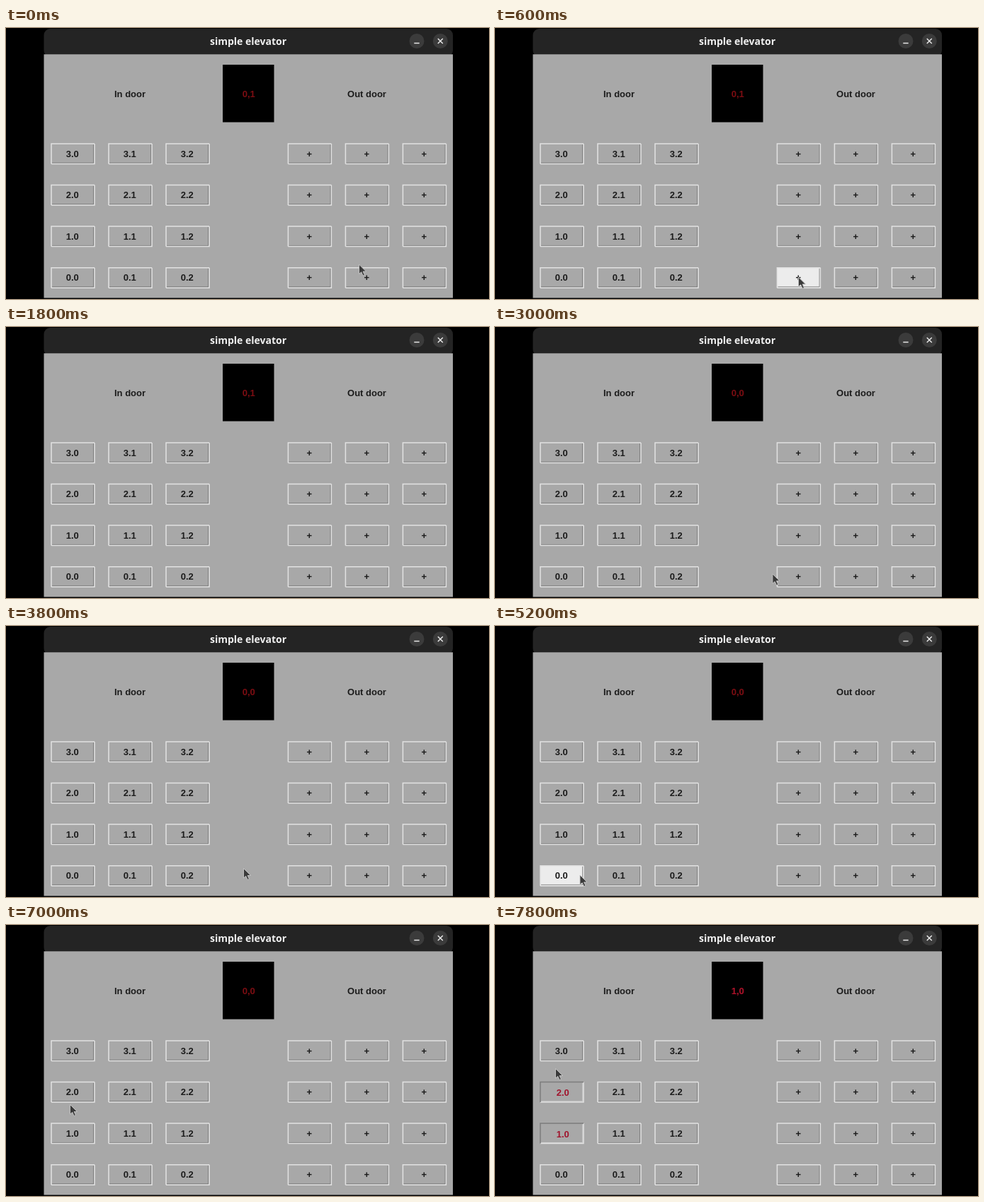
An HTML page that plays this animation: 682 by 384 pixels, repeating every 8000 ms.

```html
<!DOCTYPE html>
<html lang="en">
<head>
<meta charset="utf-8">
<title>simple elevator</title>
<style>
html, body { margin: 0; width: 100%; height: 100%; overflow: hidden; background: #000; }
svg { display: block; width: 682px; height: 384px; }
text { font: bold 13px "Liberation Sans", Arial, sans-serif; text-anchor: middle; fill: #1c1c1c; }
.title { font: bold 14px "Open Sans", "Noto Sans", sans-serif; fill: #f0f0f0; }
.face { fill: #a8a8a8; }
.hover .face { fill: #ececec; }
.light, .dark { fill: none; stroke: #e2e2e2; stroke-width: 1.5; }
.dark { stroke: #707070; stroke-width: 1; }
.lit text { fill: #a0142c; transform: translate(2px, 1px); }
.lit .top { stroke: #7c7c7c; }
.lit .dark { stroke: #d0d0d0; }
</style>
</head>
<body>
<svg viewBox="0 0 682 384">
  <rect x="53.5" y="1" width="577.5" height="40" rx="9" fill="#242424"/>
  <rect x="53.5" y="37.3" width="577.5" height="345.2" fill="#a8a8a8"/>
  <text class="title" x="342" y="24">simple elevator</text>
  <g fill="#3b3b3b"><circle cx="580" cy="18.5" r="10.5"/><circle cx="613.3" cy="18.5" r="10.5"/></g>
  <path d="M576.3 21.5h7.4M609.8 15l7 7m0-7l-7 7" fill="none" stroke="#e8e8e8" stroke-width="1.5"/>
  <text x="175" y="97.6">In door</text>
  <text x="509.5" y="97.6">Out door</text>
  <rect x="306" y="52" width="72.5" height="81.5"/>
  <text id="display" x="342.7" y="97.6"></text>
  <g id="buttons"></g>
  <path id="cursor" d="M0 0V13.6L3.2 10.8L5.6 16L7.9 15L5.6 10H10Z" fill="#3a3a3a" stroke="#c8c8c8" stroke-width=".9"/>
</svg>
<script>
const LOOP = 8000, STEP = 200, W = 61, H = 28.5;
const $ = id => document.getElementById(id);
const buttons = [];

function addButton(x, row, label, litAt = Infinity) {
  const y = 164 + (3 - row) * 58.55;
  const el = document.createElementNS("http://www.w3.org/2000/svg", "g");
  el.innerHTML = `
    <rect class="face" x="${x}" y="${y}" width="${W}" height="${H}"/>
    <path class="dark" d="M${x + 1} ${y + H - 1.2}h${W - 2.2}V${y + 1}"/>
    <path class="light" d="M${x} ${y + H}h${W}v${-H}"/>
    <path class="light top" d="M${x} ${y + H}v${-H}h${W}"/>
    <text x="${x + W / 2 - .7}" y="${y + 18.6}">${label}</text>`;
  $("buttons").append(el);
  buttons.push({ el, x, y, litAt });
}

for (let row = 0; row < 4; row++) {
  for (let col = 0; col < 3; col++) {
    const called = col === 0 && (row === 1 || row === 2);
    addButton(64 + col * 81, row, `${row}.${col}`, called ? 6800 + row * 400 : Infinity);
    addButton(398.4 + col * 81, row, "+");
  }
}

// Pointer stops: time, x, y
const stops = [
  [0, 498.5, 335], [600, 428.5, 353], [1800, 428.5, 396], [2400, 428.5, 354],
  [3800, 335.5, 343.5], [5200, 120, 353], [6600, 106, 354],
  [7000, 90.5, 254.5], [7800, 85.5, 203.5]
];

const ease = k => k * k * (3 - 2 * k);

function pointerAt(t) {
  const i = stops.findIndex(s => s[0] >= t);
  if (i < 1) return stops.at(i).slice(1);
  const [t0, x0, y0] = stops[i - 1], [t1, x1, y1] = stops[i];
  const k = ease((t - t0) / (t1 - t0));
  return [x0 + (x1 - x0) * k, y0 + (y1 - y0) * k];
}

function draw(now) {
  const t = Math.floor(now % LOOP / STEP) * STEP;
  const [px, py] = pointerAt(t);
  $("cursor").setAttribute("transform", `translate(${px} ${py})`);
  for (const { el, x, y, litAt } of buttons) {
    const over = px >= x && px <= x + W && py >= y && py <= y + H;
    el.classList.toggle("hover", over);
    el.classList.toggle("lit", t >= litAt);
  }
  $("display").textContent = t < 3000 ? "0,1" : t < 7800 ? "0,0" : "1,0";
  $("display").style.fill = t < 7800 ? "#7c0d12" : "#b0122a";
}

const start = performance.now();
function tick() {
  draw(performance.now() - start);
  requestAnimationFrame(tick);
}
tick();
</script>
</body>
</html>
```
